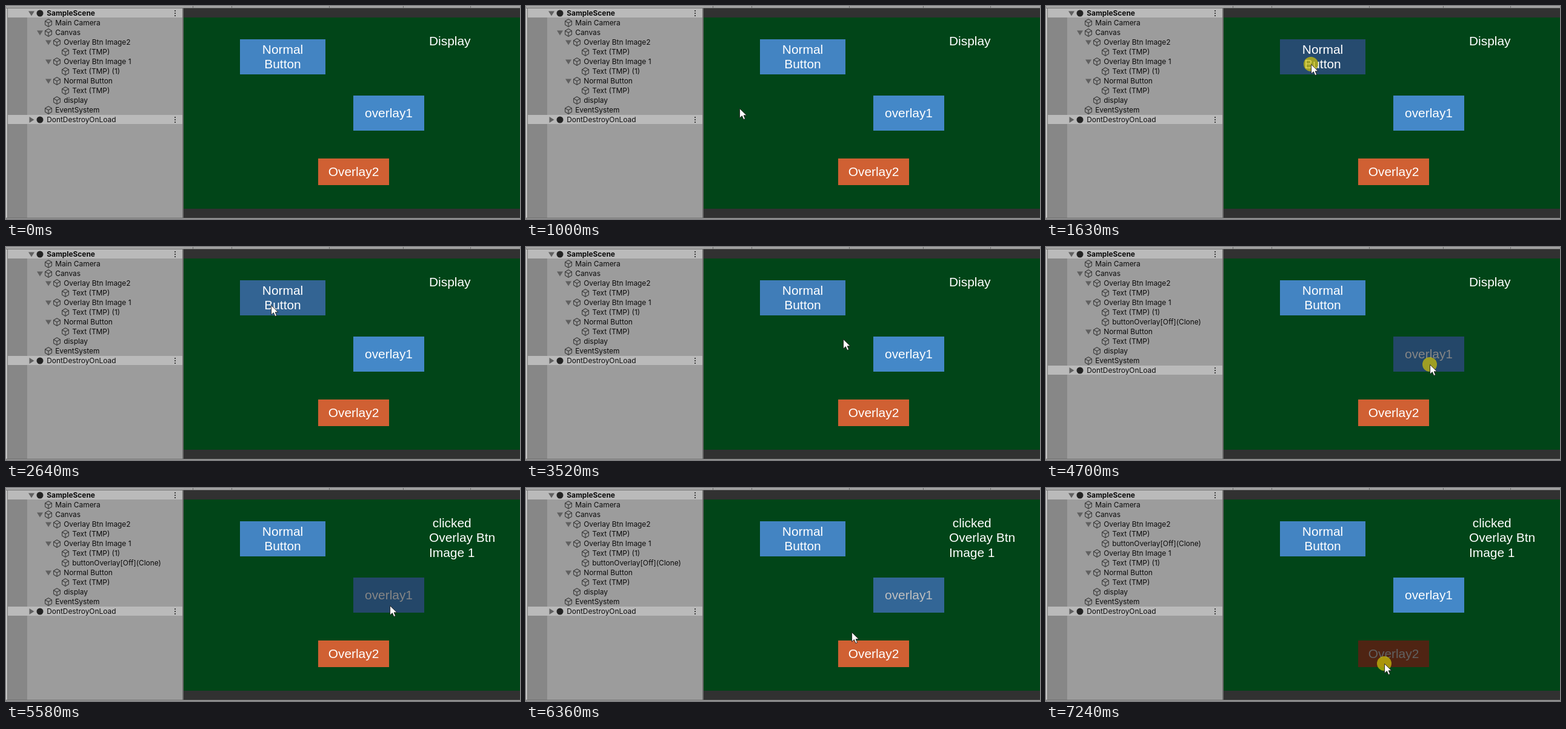
An HTML page with a canvas that plays this animation: 848x352 px, repeating every 8000 ms.

```html
<!DOCTYPE html>
<html lang="en">
<head>
<meta charset="utf-8">
<title>Overlay buttons</title>
<style>
html, body { margin: 0; width: 100%; height: 100%; overflow: hidden; background: #313131; }
canvas { display: block; }
</style>
</head>
<body>
<canvas id="stage" width="848" height="352"></canvas>
<script>
const ctx = document.getElementById('stage').getContext('2d');
const LOOP = 8000;
const STEP = 77;
const LINE = 24.3;
const UI = 'Inter, sans-serif';
const GAME = '20.9px "Liberation Sans", Arial, sans-serif';

const ENTRY = [451, 334];
const MOVES = [
  { first: 460, last: 610, to: [301, 213] },
  { first: 840, last: 1370, to: [437, 96] },
  { first: 2730, last: 2960, to: [505, 145] },
  { first: 3520, last: 3970, to: [633, 194] },
  { first: 6050, last: 6590, to: [558, 290], via: [490, 208] }
];
const ENTER1 = 3820, ENTER2 = 6500;
const PRESS = [1370, 4620, 7160], RELEASE = [2640, 5580, LOOP];

// Stepped progress 0..1; the first step already shows at `first`
function ramp(t, first, last) {
  if (t < first) return 0;
  const n = Math.round((last - first) / STEP) + 1;
  const done = Math.floor((t - first) / (last - first) * (n - 1) + 0.05) + 1;
  return Math.min(1, done / n);
}

const easeOut = p => 1 - (1 - p) ** 3;
const pressed = t => PRESS.some((p, i) => t >= p && t < RELEASE[i]);
const after = (t, t0) => t >= t0 ? 1 : 0;

function pointer(t) {
  if (t < MOVES[0].first) return null;
  return MOVES.reduce((from, { first, last, to, via }) => {
    const p = ramp(t, first, last), q = 1 - p;
    return from.map((a, i) => {
      const mid = via ? via[i] : (a + to[i]) / 2;
      return Math.round(q * q * a + 2 * p * q * mid + p * p * to[i]);
    });
  }, ENTRY);
}

// Button brightness: down on press, eased back to the hover tint, then idle
const normalShade = t => 0.43 * ramp(t, 1540, 1630)
  - 0.38 * easeOut(ramp(t, 2640, 2960)) - 0.05 * after(t, PRESS[1]);

const overlay1Shade = t => t >= ENTER2 ? 0
  : 0.22 * ramp(t, ENTER1, 3970) + 0.26 * ramp(t, PRESS[1], 4700) - 0.23 * after(t, 5650);

const overlay2Shade = t => 0.22 * ramp(t, ENTER2, 6590) + 0.4 * ramp(t, PRESS[2], 7240);

function rect(color, x, y, w, h) {
  ctx.fillStyle = color;
  ctx.fillRect(x, y, w, h);
}

function text(str, x, y, font, color, align = 'left') {
  ctx.font = font;
  ctx.fillStyle = color;
  ctx.textAlign = align;
  ctx.fillText(str, x, y);
}

function path(points, close = true) {
  ctx.beginPath();
  points.forEach(([x, y]) => ctx.lineTo(x, y));
  if (close) ctx.closePath();
}

function dot(x, y, r, color) {
  ctx.fillStyle = color;
  ctx.beginPath();
  ctx.arc(x, y, r, 0, Math.PI * 2);
  ctx.fill();
}

// Hexagon with three spokes
function cube(x, y) {
  const corner = k => [x + 6.3 * Math.sin(k * Math.PI / 3), y - 6.2 * Math.cos(k * Math.PI / 3)];
  ctx.strokeStyle = '#3c3c3c';
  ctx.lineWidth = 1.1;
  ctx.lineJoin = 'round';
  path([0, 1, 2, 3, 4, 5].map(corner));
  ctx.stroke();
  for (const k of [1, 3, 5]) {
    path([[x, y], corner(k)], false);
    ctx.stroke();
  }
}

function foldArrow(x, y, open) {
  ctx.save();
  ctx.translate(x, y);
  if (!open) ctx.rotate(-Math.PI / 2);
  path([[-5, -3.5], [5, -3.5], [0, 4.5]]);
  ctx.fillStyle = '#606060';
  ctx.fill();
  ctx.restore();
}

// Indentation gives the depth; "+" marks an open row, ">" a folded one
function treeRows(clone) {
  const extra = n => clone === n ? ['      buttonOverlay[Off](Clone)'] : [];
  return [
    '+SampleScene',
    '  Main Camera',
    '  +Canvas',
    '    +Overlay Btn Image2',
    '      Text (TMP)',
    ...extra(2),
    '    +Overlay Btn Image 1',
    '      Text (TMP) (1)',
    ...extra(1),
    '    +Normal Button',
    '      Text (TMP)',
    '    display',
    '  EventSystem',
    '>DontDestroyOnLoad'
  ];
}

function drawTree(clone) {
  rect('#9c9c9c', 0, 0, 293, 352);
  rect('#878787', 3, 4, 32, 346);
  treeRows(clone).forEach((row, i) => {
    const [, indent, mark, label] = row.match(/^( *)([+>]?)(.*)$/);
    const depth = indent.length / 2;
    const x = 56 + depth * 14, y = 12 + i * 16;
    if (depth) {
      cube(x, y);
    } else {
      rect('#bababa', 3, y - 8, 288, 15);
      for (let d = -4; d <= 4; d += 4) rect('#404040', 278, y + d - 1, 2, 2);
      dot(x, y, 5.5, '#242424');
    }
    if (mark) foldArrow(x - 14, y, mark === '+');
    text(label, x + 11.2, y + 4.2, `${i ? '' : 'bold '}11.9px ${UI}`, '#0b0b0b');
  });
  rect('#c6c6c6', 0, 0, 2, 352);
  rect('#777', 2, 4, 1, 348);
  rect('#a6a6a6', 0, 0, 293, 3);
  rect('#747474', 0, 3, 293, 1);
  rect('#6c6c6c', 291, 3, 2, 349);
}

function drawView() {
  rect('#313131', 293, 0, 555, 352);
  rect('#a3a3a3', 293, 0, 555, 3);
  rect('#5c5c5c', 293, 3, 555, 1);
  for (const x of [308, 372, 533, 655, 766]) rect('#6c6c6c', x, 0, 1, 3);
  rect('#014518', 293, 19, 555, 316);
}

function lines(list, x, y, align) {
  list.forEach((s, i) => text(s, x, y + i * LINE, GAME, '#fff', align));
}

function button(x, y, w, h, color, label, shade) {
  rect(color, x, y, w, h);
  lines(label, x + w / 2, y + h / 2 + 7.2 - (label.length - 1) * LINE / 2, 'center');
  rect(`rgba(0,0,0,${shade})`, x, y, w, h);
}

function drawPointer(t) {
  const pos = pointer(t);
  if (!pos) return;
  const [x, y] = pos;
  if (pressed(t)) dot(x, y, 12, 'rgba(205,193,10,.72)');
  ctx.save();
  ctx.translate(x + 0.6, y);
  path([[0, 0.5], [0, 16], [3.8, 12.6], [6.3, 18.5], [9, 17.4], [6.6, 11.8], [11.5, 11.8]]);
  ctx.fillStyle = '#fff';
  ctx.fill();
  ctx.strokeStyle = '#1c1c1c';
  ctx.lineWidth = 0.9;
  ctx.stroke();
  ctx.restore();
}

function draw(t) {
  drawView();
  drawTree(after(t, ENTER1) + after(t, ENTER2));
  const tint = 1 - normalShade(t);
  const blue = `rgb(${[67, 132, 194].map(c => Math.round(c * tint))})`;
  button(386, 55, 141, 58, blue, ['Normal', 'Button'], 0);
  button(573, 148, 117, 58, '#4488c8', ['overlay1'], overlay1Shade(t));
  button(515, 252, 117, 44, '#d06033', ['Overlay2'], overlay2Shade(t));
  const message = t < RELEASE[1] ? ['Display'] : ['\u00a0clicked', 'Overlay Btn', 'Image 1'];
  lines(message, 698, 65, 'left');
  drawPointer(t);
  rect('#6c6c6c', 0, 350, 848, 1);
  rect('#a0a0a0', 0, 351, 848, 1);
}

const start = performance.now();
function frame() {
  draw((performance.now() - start) % LOOP);
  requestAnimationFrame(frame);
}
frame();
</script>
</body>
</html>
```
